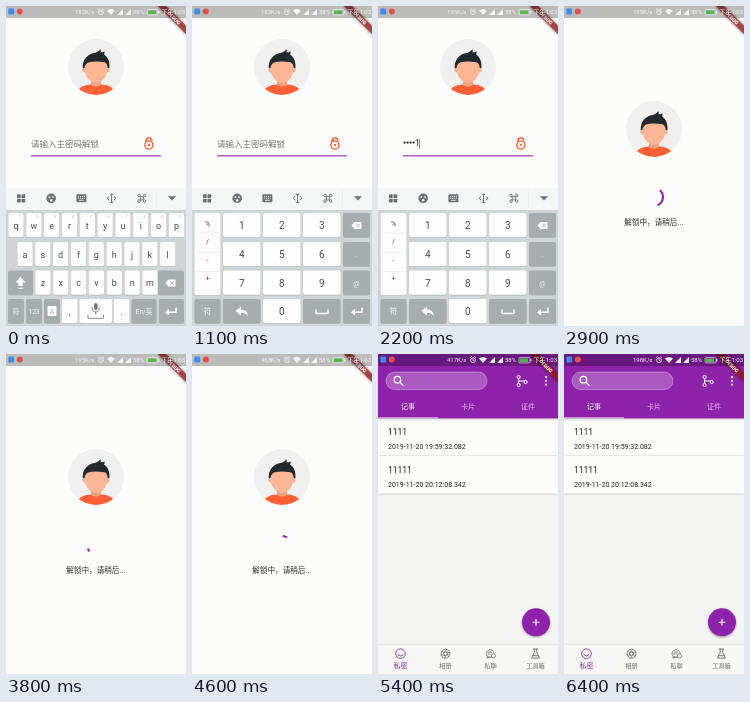
Write an HTML page that moves like this. It is 180 by 320 pixels and loops after 6500 ms.

```html
<!DOCTYPE html>
<html lang="zh-CN">
<head>
<meta charset="utf-8">
<style>
html, body { margin: 0; width: 100%; height: 100%; overflow: hidden; background: #fcfdfb; }
svg { display: block; width: 100%; height: 100%; font-family: Roboto, 'Noto Sans CJK SC', 'Noto Sans CJK', sans-serif; }
.line { fill: none; stroke-linecap: round; stroke-linejoin: round; }
</style>
</head>
<body>
<svg id="stage" viewBox="0 0 180 320" preserveAspectRatio="none"></svg>
<script>
const LOOP = 6500;
const PURPLE = '#8e24aa', DARK = '#a6adaf', ICON = '#6b7276', RED = '#f4511e';

// drawing helpers
const text = (x, y, s, size, fill, anchor = 'middle', more = '') =>
  `<text x="${x}" y="${y + size * .36}" font-size="${size}" fill="${fill}" text-anchor="${anchor}" ${more}>${s}</text>`;
const rect = (x, y, w, h, fill, r = 0, more = '') =>
  `<rect x="${x}" y="${y}" width="${w}" height="${h}" rx="${r}" fill="${fill}" ${more}/>`;
const dot = (x, y, r, fill, more = '') => `<circle cx="${x}" cy="${y}" r="${r}" fill="${fill}" ${more}/>`;
const line = (d, stroke, w = 1, more = '') => `<path class="line" d="${d}" stroke="${stroke}" stroke-width="${w}" ${more}/>`;
const shape = (d, fill) => `<path d="${d}" fill="${fill}"/>`;
const at = (x, y, body) => `<g transform="translate(${x} ${y})">${body}</g>`;
const group = (id, body) => `<g id="${id}">${body}</g>`;

const avatar = `<g>${dot(90, 61, 28, '#eff0ef')}
  <g clip-path="url(#disc)">
    ${shape('M72 90V85C74 80.5 79 79.2 84.5 78.6H95.5C101 79.2 106 80.5 108 85V90Z', '#ff5f35')}
    ${shape('M85 72H95V78.6C93 81.5 87 81.5 85 78.6Z', '#f2a17e')}
  </g>
  ${dot(78.4, 64.5, 2, '#f9b08e')}${dot(101.6, 64.5, 2, '#f9b08e')}
  ${shape('M79 58C82 52 98 52 101 58V65C101 71 95 77 90 77S79 71 79 65Z', '#fbb795')}
  ${shape('M76.8 62.5C76.2 55 80 50 86 47.6C90 46.8 93 45.6 94.3 43.2C95 44.5 95 45.5 94.5 46.4C96 46.4 97.5 46 98.4 45.2C98.8 46.6 98.4 47.8 98 48.6C102 51 104 56 103.4 62.5L101.5 62C101.5 59 100.5 57.2 98.5 56.3C92 55.2 87 55 82 56.6C80 57.8 78.7 59.5 78.6 62Z', '#23282d')}
</g>`;

function loginPage() {
  const lock = line('M139.9 135.6V134.6C139.9 131 145.6 131 145.9 134', RED, 1.3) +
    dot(142.9, 139, 4.1, 'none', `stroke="${RED}" stroke-width="1.3"`) +
    line('M141.9 138L143.9 140M143.9 138L141.9 140', RED, .9);
  return avatar + lock +
    text(25, 138, '请输入主密码解锁', 8.5, '#757575', 'start', 'id="hint"') +
    group('typed', '') + rect(25, 149.3, 130, 1.1, PURPLE, 0, 'id="under"') +
    rect(25, 133.5, .8, 9, '#555', 0, 'id="cursor"');
}

const loadingPage = at(0, 62, avatar) +
  `<path id="spin" fill="none" stroke="${PURPLE}" stroke-width="2" stroke-linecap="square"/>` +
  text(60.3, 216, '解锁中，请稍后...', 7.6, '#2b2b2b', 'start');

// keyboard
const key = (x, y, w, label = '', size = 9, dark = false, id = '') =>
  rect(x, y + .8, w, 24.3, '#b2b8ba', 2) +
  rect(x, y, w, 24.3, dark ? DARK : '#fdfdfd', 2, id && `id="${id}"`) +
  text(x + w / 2, y + 12.7, label, size, dark ? '#f6f6f6' : '#4a4a4a');

const backspace = at(164.5, 0, shape('M-5 0L-2 -3.5H5V3.5H-2Z', '#fff') + line('M0 -1.5L3 1.5M3 -1.5L0 1.5', DARK, .9));
const enter = at(165, 305.5, line('M5 -3.5V.8H-4', '#fff', 1.4) + shape('M-6 .8L-2 -2.4V4Z', '#fff'));
const ROWS = [207, 236, 264.5, 293];

function toolbar() {
  const grid = [[-4, -4], [.5, -4], [-4, .5], [.5, .5]].map(([x, y]) => rect(x, y, 3.7, 3.7, ICON, .4)).join('');
  const face = dot(0, 0, 4.8, ICON) + dot(-1.8, -1.2, .9, '#fff') + dot(1.8, -1.2, .9, '#fff') + dot(0, 2, 1.2, '#fff');
  const board = rect(-5, -4, 10, 8, ICON, .8) +
    line('M-2.8 -1.7H3M-2.8 0H3', '#fff', .9, 'stroke-dasharray=".2 1.7"') + line('M-2 2H2', '#fff', .8);
  const caret = line('M0 -4V4M-1.3 -4H1.3M-1.3 4H1.3M-2.6 -1.6L-4.5 0L-2.6 1.6M2.6 -1.6L4.5 0L2.6 1.6', ICON, 1);
  const clover = rect(-1.6, -1.6, 3.2, 3.2, 'none', 0, `stroke="${ICON}" stroke-width=".9"`) +
    [[-1, -1], [1, -1], [-1, 1], [1, 1]].map(([x, y]) => dot(x * 2.8, y * 2.8, 1.3, 'none', `stroke="${ICON}" stroke-width=".9"`)).join('');
  const down = shape('M-4 -2H4L0 2.3Z', ICON);
  return rect(0, 182, 180, 22, '#f5f6f6') +
    [grid, face, board, caret, clover, down].map((icon, i) => at(15 + i * 30.2, 192.3, icon)).join('') +
    rect(150.5, 184, .5, 17, '#e4e7e8');
}

function letters() {
  let out = '';
  ['qwertyuiop', 'asdfghjkl', 'zxcvbnm'].forEach((row, r) => {
    const first = [10, 19, 37][r];
    [...row].forEach((c, i) => {
      const x = first + i * 17.83;
      out += key(x - 7.6, ROWS[r], 15.2, c, 9);
      out += text(x + 3.5, ROWS[r] + 4, r ? '·' : (i + 1) % 10, 3, '#aaa');
    });
  });
  out += key(2, ROWS[2], 25, '', 9, true) + key(152, ROWS[2], 26, '', 9, true);
  out += shape('M14.5 271L9.5 276.5H12.3V280H16.7V276.5H19.5Z', '#fff') + line('M12.6 282.2H16.4', '#fff', 1) + at(0, 277, backspace);
  out += key(2, ROWS[3], 16, '符', 7, true) + key(20, ROWS[3], 16, '123', 6.5, true, 'numKey') +
    key(38, ROWS[3], 16, '', 7, true) + rect(41.5, 300, 9, 10, '#fff', 1) + text(46, 305, 'A', 7, DARK) +
    key(56, ROWS[3], 15.5, ',', 9) + key(73.5, ROWS[3], 32.5) + key(108, ROWS[3], 15.5, '.', 9) +
    key(125.5, ROWS[3], 25, 'En/英', 6.5, true) + key(153, ROWS[3], 25, '', 9, true) + enter;
  out += rect(88, 297, 3.6, 7, '#777', 1.8) + line('M86.2 301.5Q86.2 306 89.8 306Q93.4 306 93.4 301.5M89.8 306V308.5', '#777', .9) +
    line('M82 309V312.3H97.5V309', '#888', .9);
  return out;
}

function numbers() {
  let out = rect(2.5, 207.8, 26, 82.3, '#b2b8ba', 2) + rect(2.5, 207, 26, 82.3, '#fdfdfd', 2);
  ['%', '/', '-', '+'].forEach((c, i) => {
    out += text(15.5, 217 + i * 18.6, c, 7, '#4a4a4a');
    if (i) out += rect(4, 207.5 + i * 19.2, 23, .5, '#dde1e2');
  });
  for (let i = 0; i < 9; i++)
    out += key(31 + i % 3 * 40, ROWS[i / 3 | 0], 37.5, i + 1, 10, false, 'digit' + (i + 1));
  ['', '.', '@'].forEach((c, i) => out += key(151, ROWS[i], 27, c, 7, true));
  out += key(2.5, ROWS[3], 26, '符', 7.5, true) + key(31, ROWS[3], 37.5, '', 9, true) + key(71, ROWS[3], 37.5, '0', 10) +
    key(111, ROWS[3], 37.5, '', 9, true) + key(151, ROWS[3], 27, '', 9, true) + enter + at(0, 219.5, backspace);
  out += shape('M43.5 305L49 300.5V303.4Q55.5 303.5 56 310Q53 306.6 49 306.7V309.5Z', '#fff') +
    line('M124 304V307.5H136V304', '#fff', 1.3);
  return out;
}

const keyboard = rect(0, 182, 180, 138, '#cfd5d6') + toolbar() + group('letters', letters()) + group('numbers', numbers());

function mainPage() {
  const item = (y, title, date) => rect(0, y, 180, 37.2, '#fcfdfb', 0, 'filter="url(#soft)"') +
    text(10, y + 13.9, title, 8.5, '#222', 'start') + text(10, y + 28.2, date, 7, '#222', 'start');
  let out = rect(0, 0, 180, 320, '#f5f6f3') +
    item(64.5, '1111', '2019-11-20 19:59:32.082') + item(102, '11111', '2019-11-20 20:12:08.342') +
    rect(0, 0, 180, 64.4, PURPLE, 0, 'filter="url(#soft)"');
  out += rect(8, 18, 101, 17.6, '#fff', 8.8, 'fill-opacity=".25" stroke="#fff" stroke-opacity=".55" stroke-width=".6"') +
    dot(19.4, 25.7, 3.3, 'none', 'stroke="#fff" stroke-width="1.2"') + line('M22 28.3L25 31.2', '#fff', 1.3);
  out += line('M140.6 24V30M140.6 27H146', '#fff', 1) +
    [[140.6, 23], [140.6, 31], [147.6, 28]].map(([x, y]) => dot(x, y, 1.6, PURPLE, 'stroke="#fff"')).join('') +
    [23, 26.8, 30.6].map(y => dot(168, y, 1.1, '#fff')).join('');
  ['记事', '卡片', '证件'].forEach((s, i) => out += text(30 + i * 60, 52.2, s, 7, i ? '#dfbde6' : '#fff'));
  out += rect(0, 63.4, 60, 1, '#fff', 0, 'fill-opacity=".85"');
  out += dot(158, 268.3, 14, PURPLE, 'filter="url(#drop)"') + line('M155 268.3H161M158 265.3V271.3', '#fff', 1.1);

  const grey = '#6a6a6a';
  const ring = (r, c) => dot(0, 0, r, 'none', `stroke="${c}" stroke-width=".9"`);
  const icons = [
    ring(4.8, PURPLE) + line('M-2.5 1.2Q0 3.8 2.5 1.2', PURPLE, .9),
    ring(4.5, grey) + ring(1.8, grey) + [0, 60, 120, 180, 240, 300].map(a => line('M1.8 0L3.2 3', grey, .7, `transform="rotate(${a})"`)).join(''),
    line('M1 3.4A4 3.8 0 1 1 3.6 -.6M-2.8 2.8L-4 4.2L-.5 3.6M-2.6 -1.6H1.2M-2.6 .3H0', grey, .8) + dot(2.9, 2.2, 2.1, 'none', `stroke="${grey}" stroke-width=".8"`),
    line('M-2.2 -4.6H2.2M-1.3 -4.6V-1.2L-4 4.4H4L1.3 -1.2V-4.6M-2.8 2H2.8', grey, .9)
  ];
  out += rect(0, 291, 180, 29, '#f7f8f5', 0, 'filter="url(#soft)"');
  ['私密', '相册', '私聊', '工具箱'].forEach((s, i) => {
    const x = 22.5 + i * 45;
    out += at(x, 299.7, icons[i]) + text(x, 311.9, s, i ? 6.2 : 7, i ? grey : PURPLE);
  });
  return out;
}

const banner = `<g transform="translate(180 0) rotate(45)">` +
  rect(-20, 14, 40, 6, '#000', 0, 'fill-opacity=".5" filter="url(#blur)"') +
  rect(-20, 14, 40, 6, '#b71c1c', 0, 'fill-opacity=".63"') +
  text(0, 17, 'DEBUG', 5.1, '#fff', 'middle', 'font-weight="900"') + '</g>';

function statusBar() {
  const W = '#f5f5f5';
  const bars = x => at(x, 9, shape('M0 0H6V-6Z', W));
  return rect(0, 0, 180, 12, '#000', 0, 'fill-opacity=".26"') +
    rect(2.3, 2.6, 5.8, 5.8, '#3d8bf0', 1.2) + dot(13.8, 5.6, 3, '#e2504a') +
    text(69, 6.2, '', 6, W, 'start', 'id="speed"') +
    dot(95, 6.2, 2.4, 'none', `stroke="${W}" stroke-width=".8"`) + line('M95 4.8V6.3H96M92.3 3.5L93.3 2.7M97.7 3.5L96.7 2.7', W, .7) +
    shape('M101 4.4Q105 1.4 109 4.4L105 9Z', W) + bars(111) + bars(119) +
    text(127, 6.2, '58%', 6, W, 'start') +
    rect(141, 3.5, 11, 5.4, 'none', 1, `stroke="${W}" stroke-width=".6"`) + rect(142, 4.4, 8, 3.6, '#54b948', .5) + rect(152.4, 5, 1, 2.4, W) +
    text(155.5, 6.2, '下午1:03', 6, W, 'start');
}

document.getElementById('stage').innerHTML = `<defs>
  <clipPath id="disc"><circle cx="90" cy="61" r="28"/></clipPath>
  <filter id="soft" x="-5%" y="-20%" width="110%" height="150%"><feDropShadow dx="0" dy=".6" stdDeviation=".8" flood-opacity=".28"/></filter>
  <filter id="drop" x="-40%" y="-60%" width="180%" height="240%"><feDropShadow dx="0" dy="1" stdDeviation="1.3" flood-opacity=".38"/></filter>
  <filter id="blur" x="-20%" y="-100%" width="140%" height="300%"><feGaussianBlur stdDeviation="1.7"/></filter>
  </defs>` + rect(0, 0, 180, 320, '#fcfdfb') +
  group('login', loginPage()) + group('loading', loadingPage) + group('keys', keyboard) +
  group('main', mainPage()) + banner + statusBar();

// motion
const el = id => document.getElementById(id);
const set = (id, attrs) => { for (const a in attrs) el(id).setAttribute(a, attrs[a]); };
const show = (id, on) => set(id, { display: on ? 'inline' : 'none' });
const clamp = v => Math.min(1, Math.max(0, v));

const bezier = (x1, y1, x2, y2) => x => {
  const f = (a, b, s) => 3 * (1 - s) ** 2 * s * a + 3 * (1 - s) * s * s * b + s ** 3;
  let lo = 0, hi = 1;
  for (let i = 0; i < 24; i++) {
    const mid = (lo + hi) / 2;
    if (f(x1, x2, mid) < x) lo = mid; else hi = mid;
  }
  return f(y1, y2, lo);
};
const fastOutSlowIn = bezier(.4, 0, .2, 1), easeIn = bezier(.42, 0, 1, 1);

const TYPED = [1180, 1400, 1720, 1920, 2120];
const SPEEDS = [[0, 182], [1700, 195], [4100, 463], [4850, 417], [5800, 198]];
const T = { numbers: 550, hide: 2640, center: 2680, load: 2748, done: 4950, push: 4981 };

// indeterminate ring: head runs ahead, tail follows, one cycle per second
function spinner(ms) {
  const n = Math.floor(ms / 1000), p = ms / 1000 - n;
  const head = fastOutSlowIn(clamp(p * 2)), tail = fastOutSlowIn(clamp(p * 2 - 1));
  const a = Math.PI * (-.5 + tail * 1.5 + p * 1.7 - n * .8);
  const b = a + Math.max((head - tail) * 1.5 * Math.PI, .01);
  const pt = r => `${90 + 9 * Math.cos(r)} ${191 + 9 * Math.sin(r)}`;
  return `M${pt(a)}A9 9 0 ${b - a > Math.PI ? 1 : 0} 1 ${pt(b)}`;
}

function update(t) {
  const loading = t >= T.load && t < T.done, finished = t >= T.done;
  const count = finished ? 0 : TYPED.filter(c => t >= c).length;

  show('login', !loading);
  set('login', { transform: `translate(0 ${t >= T.center ? 69 : 0})` });
  show('hint', !count);
  let body = '';
  for (let i = 0; i < count - 1; i++) body += dot(26.6 + i * 3, 136.6, 1.15, '#222');
  if (count) body += text(25 + (count - 1) * 3, 136.6, '1', 8.5, '#222', 'start');
  el('typed').innerHTML = body;
  set('under', { fill: finished ? '#9a9a9a' : PURPLE, height: finished ? .6 : 1.1 });
  set('cursor', { x: count ? 26.2 + count * 3 : 25 });
  show('cursor', count || finished || t % 1000 >= 500);

  show('loading', loading);
  if (loading) set('spin', { d: spinner(t - T.load) });

  const hide = clamp((t - T.hide) / 200);
  show('keys', hide < 1);
  set('keys', { transform: `translate(0 ${138 * hide * hide})` });
  show('letters', t < T.numbers);
  show('numbers', t >= T.numbers);
  set('numKey', { fill: t >= 400 ? '#838c90' : DARK });
  set('digit1', { fill: TYPED.some(c => Math.abs(t - c) < 55) ? '#cfd5d7' : '#fdfdfd' });

  const p = clamp((t - T.push) / 300);
  show('main', p > 0);
  set('main', { opacity: easeIn(p), transform: `translate(0 ${80 * (1 - fastOutSlowIn(p))})` });

  el('speed').textContent = SPEEDS.filter(s => t >= s[0]).pop()[1] + 'K/s';
}

const start = performance.now();
function tick() {
  update((performance.now() - start) % LOOP);
  requestAnimationFrame(tick);
}
tick();
</script>
</body>
</html>
```
